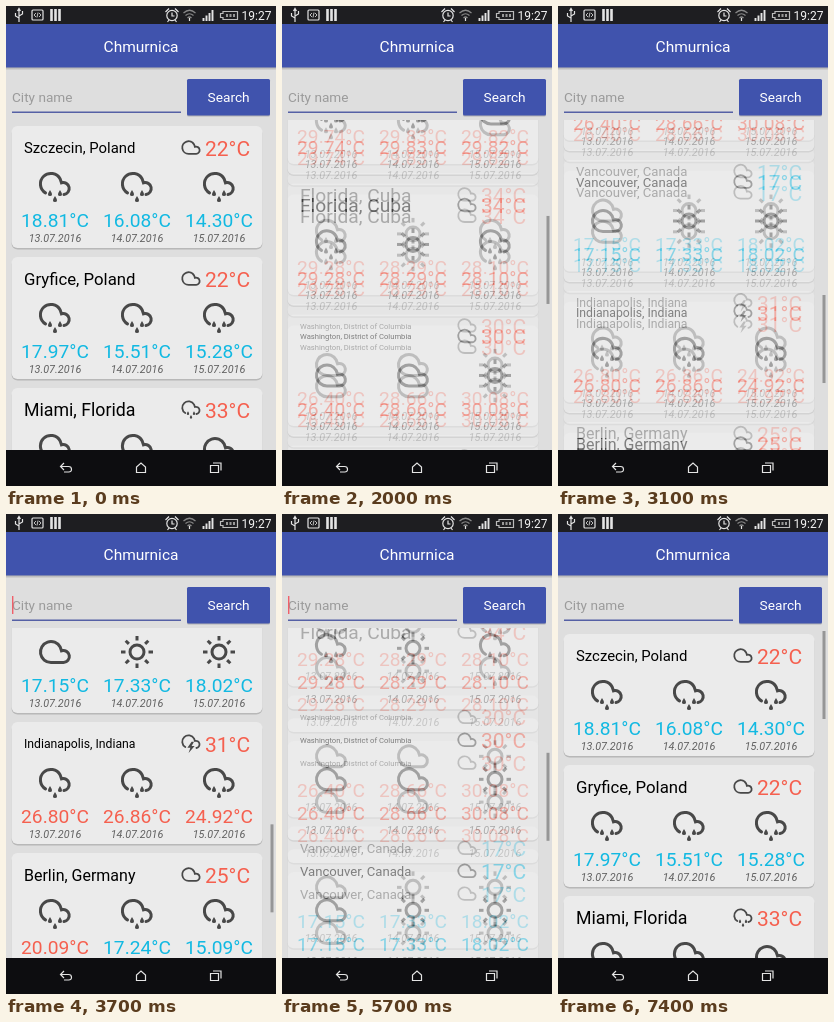
An HTML page for the animation above (7500 ms loop, 270 by 480 pixels).

```html
<!DOCTYPE html>
<html lang="en">
<head>
<meta charset="utf-8">
<title>Weather list</title>
<style>
html, body { margin: 0; width: 100%; height: 100%; overflow: hidden; background: #000 }
svg { display: block; width: 270px; height: 480px; font-family: Roboto, "Noto Sans", sans-serif }
.line { fill: none; stroke: #484848; stroke-width: 3 }
.solid { fill: #484848 }
.white { fill: none; stroke: #e4e4e4; stroke-width: 1.2 }
.mid { text-anchor: middle }
.date { font-size: 10.8px; font-style: italic; fill: #606060 }
</style>
</head>
<body>
<svg viewBox="0 0 270 480">
  <defs>
    <clipPath id="view"><rect y="114" width="270" height="330"/></clipPath>
    <linearGradient id="drop" x2="0" y2="1">
      <stop stop-color="#000" stop-opacity=".22"/><stop offset="1" stop-color="#000" stop-opacity="0"/>
    </linearGradient>
    <path id="open" class="line" d="M-9.500 5.900A10.5 10.5 0 1 1 5.200-8L6.500-4.200A6 6 0 1 1 9 7.500" stroke-linecap="round"/>
    <g id="cloud"><path class="line" d="M-4 10.5A10.5 10.5 0 1 1 5.200-5L6.500-1.200A6 6 0 1 1 8.500 10.5Z"/></g>
    <g id="rain"><use href="#open"/>
      <path class="solid" d="M-5 3q4 6 0 6t0-6M5 3q4 6 0 6t0-6M0 9q4 6 0 6t0-6"/></g>
    <g id="storm"><use href="#open"/><path class="solid" d="M1-3L-6 7H-1L-4 16L6 4H1L5-3Z"/></g>
    <g id="sun"><circle class="line" r="7"/></g>
  </defs>

  <rect y="61" width="270" height="383" fill="#dedede"/>
  <g clip-path="url(#view)">
    <g class="layer"><use href="#list"/></g>
    <g class="layer" opacity=".5"><use href="#list"/></g>
    <g class="layer" opacity=".45"><g id="list"><rect y="-20" width="270" height="1400" fill="#dedede"/></g></g>
    <circle id="touch" cx="167" r="8" fill="#fff" fill-opacity=".15" stroke="#aaa" stroke-opacity=".5"/>
    <rect id="thumb" x="264.500" width="3" height="88" fill="#969696"/>
  </g>

  <rect y="18" width="270" height="43.500" fill="#4053ad"/>
  <rect y="61.500" width="270" height="3" fill="url(#drop)"/>
  <text class="mid" x="135" y="46" font-size="15.5" fill="#fff">Chmurnica</text>
  <text x="6" y="96" font-size="13.6" fill="#9b9b9b">City name</text>
  <rect x="6" y="105.500" width="169" height="1.500" fill="#5560a5"/>
  <rect id="caret" x="6" y="82" width="1.400" height="18" fill="#f0606a"/>
  <rect x="181" y="74" width="83" height="36.500" rx="1.500" fill="#b4b4b4"/>
  <rect x="181" y="73" width="83" height="36.500" rx="1.500" fill="#4053ad"/>
  <text class="mid" x="222.600" y="96" font-size="13.7" fill="#fff">Search</text>

  <rect width="270" height="18" fill="#1e1e21"/>
  <g class="white">
    <path d="M13 3V16M13 12L9.500 10V7M13 10L16.500 8V5M11.500 5L13 2.500L14.500 5"/>
    <rect x="26" y="4" width="11" height="10" rx="1"/>
    <path d="M30 7L28 9L30 11M33 7L35 9L33 11M32 6.500L31 11.500" stroke-width=".8"/>
    <path d="M45.500 3V15M49.500 3V15M53.500 3V15" stroke-width="2.600"/>
    <circle cx="166" cy="9.500" r="5.200"/>
    <path d="M166 6.500V10H168.500M159.500 6L163 2.500M172.500 6L169 2.500M161.500 16L163 14M170.500 16L169 14"/>
    <path d="M177.500 7Q183.500 1.500 189.500 7M179.500 9.500Q183.500 6 187.500 9.500M181.500 12Q183.500 10 185.500 12" stroke="#888"/>
    <path d="M183.500 12V15"/>
    <path d="M197.500 15V12M200.500 15V9.500M203.500 15V7M206.500 15V4" stroke-width="1.900"/>
    <path d="M217 5.500H231.500V13.500H217V11.500H214.500V7.500H217Z" stroke="#bbb"/>
    <path d="M220 9.500H229" stroke="#999" stroke-width="3" stroke-dasharray="2 1.500"/>
  </g>
  <text x="235.500" y="14" font-size="12" fill="#f4f4f4">19:27</text>

  <rect y="444" width="270" height="36" fill="#0d0d10"/>
  <g class="white">
    <path d="M58 457L54.500 460.500L58 464M55 460.500H62.500Q65.500 460.500 65.500 463.300T62.500 466H58"/>
    <path d="M130.500 466.500V461L135 457L139.500 461V466.500Z"/>
    <path d="M204.500 459.500H212.500V466.500H204.500ZM207 457H215V464.500"/>
  </g>
</svg>
<script>
const LOOP = 7500, STEP = 100, PITCH = 131;
const BLEND = [33, -33, 0];  // neighbouring moments mixed into each picture
const $ = id => document.getElementById(id);
const layers = [...document.querySelectorAll('.layer')];

// city, icon and temperature now, then icon and temperature for three days
const cities = [
  ['Szczecin, Poland', 'cloud 22', 'rain 18.81', 'rain 16.08', 'rain 14.30'],
  ['Gryfice, Poland', 'cloud 22', 'rain 17.97', 'rain 15.51', 'rain 15.28'],
  ['Miami, Florida', 'rain 33', 'rain 29.74', 'rain 29.83', 'cloud 29.82'],
  ['Florida, Cuba', 'cloud 34', 'rain 29.28', 'sun 28.29', 'rain 28.10'],
  ['Washington, District of Columbia', 'cloud 30', 'cloud 26.40', 'cloud 28.66', 'sun 30.08'],
  ['Vancouver, Canada', 'cloud 17', 'cloud 17.15', 'sun 17.33', 'sun 18.02'],
  ['Indianapolis, Indiana', 'storm 31', 'rain 26.80', 'rain 26.86', 'rain 24.92'],
  ['Berlin, Germany', 'cloud 25', 'rain 20.09', 'rain 17.24', 'rain 15.09'],
  ['Paris, France', 'rain 20', 'rain 16.06', 'rain 16.08', 'rain 16.29']
];

function add(parent, tag, attrs, text = '') {
  const el = document.createElementNS('http://www.w3.org/2000/svg', tag);
  for (const k in attrs) el.setAttribute(k, attrs[k]);
  el.textContent = text;
  return parent.appendChild(el);
}

function reading(card, value, attrs) {
  const fill = value < 20 ? '#12b9e2' : '#f5604f';
  add(card, 'text', { fill, ...attrs }, value + '°C');
}

for (let i = 0; i < 8; i++)
  add($('sun'), 'path', { class: 'line', d: 'M0-11.5V-16', transform: `rotate(${i * 45})` });

cities.forEach(([name, now, ...days], i) => {
  const card = add($('list'), 'g', { transform: `translate(0 ${120 + i * PITCH})` });
  const box = { x: 5.5, width: 251, height: 122, rx: 6 };
  add(card, 'rect', { ...box, y: 1.5, fill: '#b8b8b8' });
  add(card, 'rect', { ...box, y: 0, fill: '#ebebeb' });

  // the title shrinks to the room left of the icon
  const title = add(card, 'text', { x: 18, 'font-size': 100 }, name);
  const size = Math.min(19.5, 11150 / title.getComputedTextLength());
  title.setAttribute('font-size', size);
  title.setAttribute('y', 22 + size * .35);

  const [icon, temp] = now.split(' ');
  add(card, 'use', { href: '#' + icon, transform: 'translate(185 21.5) scale(.6)' });
  reading(card, temp, { x: 199, y: 30, 'font-size': 21 });
  days.forEach((day, d) => {
    const x = 49 + d * 82, [icon, temp] = day.split(' ');
    add(card, 'use', { href: '#' + icon, x, y: 61 });
    reading(card, temp, { x, y: 101.3, class: 'mid', 'font-size': 19.2 });
    add(card, 'text', { x, y: 116, class: 'mid date' }, `${13 + d}.07.2016`);
  });
});

// time, scroll offset, speed
const path = [
  [850, 0, 0], [1300, 123, .2], [2500, 452, .1], [3500, 698, 0], [3800, 698, 0],
  [4650, 850, 0], [4850, 850, 0], [6300, 131, -.2], [7200, 0, 0]
];

function scrollAt(t) {
  const i = path.findIndex(p => p[0] >= t);
  if (i < 1) return 0;
  const [t0, a, va] = path[i - 1], [t1, b, vb] = path[i];
  const d = t1 - t0, u = (t - t0) / d, w = 1 - u;
  return w * w * (1 + 2 * u) * a + u * u * (3 - 2 * u) * b + u * w * d * (w * va - u * vb);
}

function draw(now) {
  const t = Math.floor(now % LOOP / STEP) * STEP, s = scrollAt(t);
  layers.forEach((g, i) =>
    g.setAttribute('transform', `translate(0 ${-scrollAt(t + BLEND[i])})`));
  $('thumb').setAttribute('y', 117 + s * .277);
  $('thumb').style.opacity = t >= 800 ? 1 : 0;
  $('touch').setAttribute('cy', 332 - s);
  $('touch').style.opacity = t >= 900 && t <= 1300 ? 1 : 0;
  $('caret').style.opacity = t % 1000 >= 500 ? 1 : 0;
  requestAnimationFrame(() => draw(performance.now() - start));
}
const start = performance.now();
draw(0);
</script>
</body>
</html>
```
